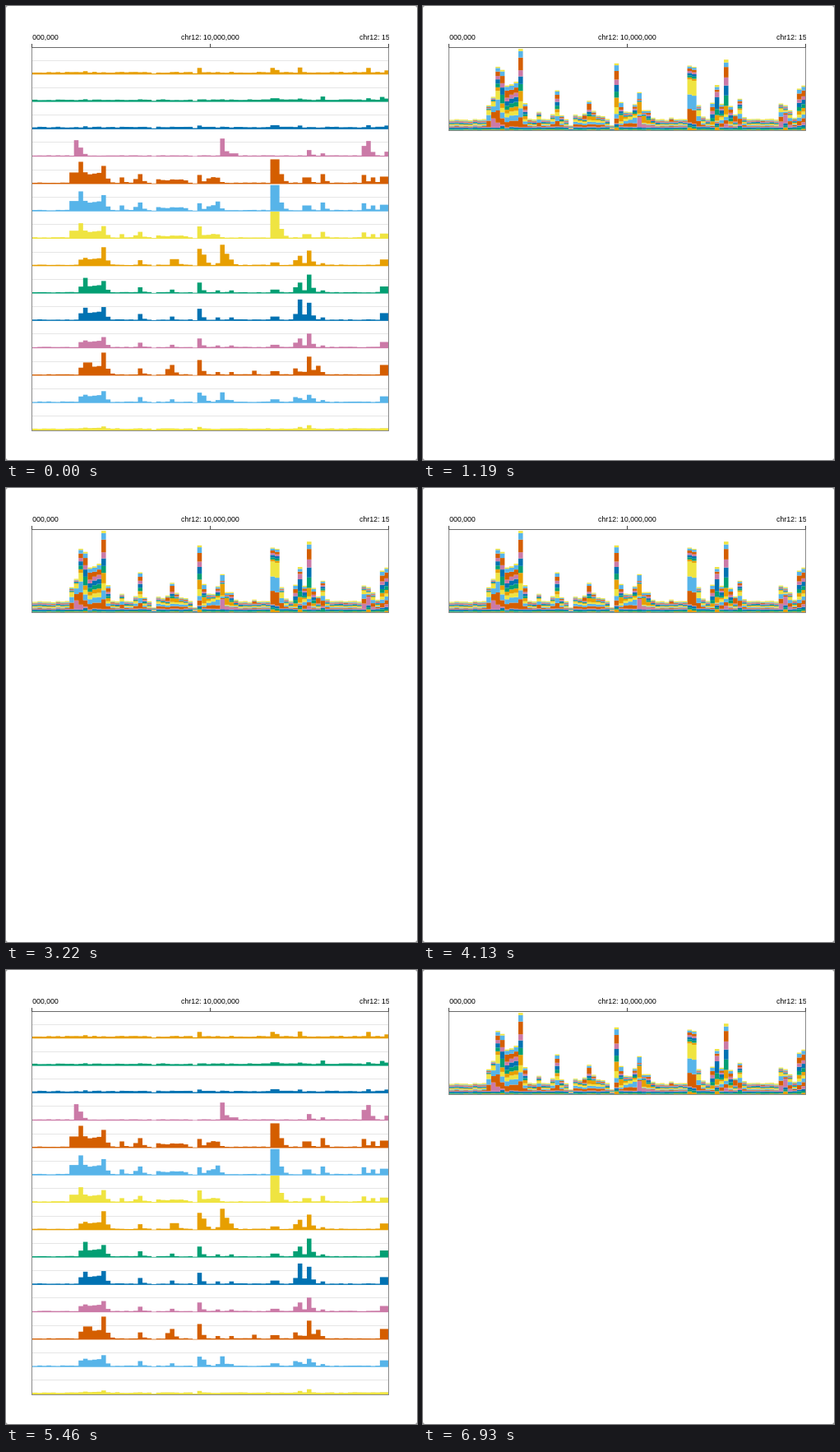
Animation of 500x552 px, one loop 7280 ms. Source, as a matplotlib script:

```python
import numpy as np
import matplotlib.pyplot as plt
from matplotlib.animation import FuncAnimation
from matplotlib.patches import Polygon, Rectangle

W, H, DPI = 500, 552, 64
PX = 72 / DPI                       # points per pixel
STEP, LOOP, CYCLE = 70, 7280, 5740  # ms
LEFT, RIGHT, TOP = 31.5, 465.5, 50.5
ROW_H = 466 / 14
STACK_BOTTOM, STACK_SCALE = 152, 0.55
BINS, BIN_W, FIRST_BIN = 78, 5.555, 32.7
TAIL = 0.3                          # fall-off per bin after a peak
COLORS = ["#E79F00", "#029F73", "#0072B2", "#CB7AA7",
          "#D45E00", "#57B4E9", "#EFE441"]
GRAY, PALE = "#8a8a8a", "#e6e6e6"

plt.rcParams["font.family"] = "Liberation Sans"
fig = plt.figure(figsize=(W / DPI, H / DPI), dpi=DPI, facecolor="white")
ax = fig.add_axes([0, 0, 1, 1])
ax.set_xlim(0, W)
ax.set_ylim(H, 0)
ax.axis("off")

edges = np.concatenate([[31], FIRST_BIN + BIN_W * np.arange(BINS), [466]])
rng = np.random.default_rng(12)
wobble = rng.uniform(0.8, 1.2, BINS)
rows = []

# Peaks shared by related samples: (bin, width, height)
FLAT = [(11, 1, 4), (36, 1, 5), (52, 2, 5.5), (58, 1, 5), (73, 1, 5.5),
        (77, 1, 5)]
BROAD = [(8, 2, 14), (11, 4, 14), (10, 1, 27), (15, 1, 22), (19, 1, 8),
         (22, 1, 6), (23, 1, 12), (27, 7, 5), (36, 1, 11), (38, 3, 8),
         (52, 2, 30), (54, 1, 12), (59, 2, 8), (63, 1, 12), (72, 1, 11),
         (74, 1, 8), (76, 2, 9)]
SHARP = [(10, 5, 11), (15, 1, 16), (23, 1, 8), (30, 1, 5), (36, 1, 14),
         (40, 1, 4), (43, 1, 4), (52, 2, 5), (57, 1, 8), (58, 1, 14),
         (60, 1, 21), (63, 1, 4), (76, 2, 9)]


def signal(peaks):
    y = np.zeros(BINS)
    for first, width, height in peaks:
        end = first + width
        y[first:end] = height
        if width > 2:
            y[first:end] *= wobble[first:end]
        for k, i in enumerate(range(end, min(end + 4, BINS)), 1):
            y[i] = max(y[i], height * TAIL ** k)
    return y


def add_row(floor, peaks, scale=1, *own):
    """One sample: scaled family peaks, its own peaks and a noisy floor."""
    scaled = [(first, width, h * scale) for first, width, h in peaks]
    noise = floor * rng.uniform(0.8, 1.2, BINS)
    noise[[26, 35]] *= 0.5
    y = np.maximum(signal(scaled + list(own)), noise)
    rows.append(np.concatenate([y[:1], y]))


add_row(2.7, FLAT, 1, (36, 1, 8), (52, 1, 8), (58, 1, 8.5), (73, 1, 8))
add_row(2.6, FLAT, 0.8, (36, 1, 3), (63, 1, 6.5), (76, 1, 6))
add_row(2.6, FLAT, 0.9)
add_row(1.4, [(9, 1, 20), (10, 1, 11), (41, 1, 22), (43, 2, 4), (60, 1, 8),
              (63, 1, 4), (72, 1, 13), (73, 1, 19), (77, 1, 6)])
add_row(1.6, BROAD)
add_row(1.6, BROAD, 0.9, (40, 1, 12), (52, 2, 32))
add_row(1.6, BROAD, 0.7, (36, 1, 15), (52, 2, 33), (54, 1, 12))
add_row(1.6, SHARP, 0.9, (15, 1, 23), (30, 2, 8.5), (36, 1, 21), (37, 1, 14),
        (41, 1, 26), (42, 1, 15), (43, 1, 8))
add_row(1.6, SHARP, 0.95, (11, 1, 19), (60, 1, 23))
add_row(1.6, SHARP, 1.05, (11, 1, 16), (58, 1, 26))
add_row(1.6, SHARP, 0.85)
add_row(1.5, SHARP, 1.1, (11, 2, 16), (15, 1, 28), (29, 1, 8), (30, 1, 13),
        (36, 1, 19), (48, 1, 6), (58, 1, 5), (62, 1, 12), (76, 2, 13))
add_row(1.6, SHARP, 0.9, (37, 1, 9), (41, 1, 13), (58, 1, 6), (60, 1, 10))
add_row(2.2, SHARP, 0.3)


def line(x, y, color=GRAY, z=3):
    return ax.plot(x, y, color=color, lw=PX, zorder=z, snap=False,
                   solid_capstyle="butt")[0]


def frame(bottom, closed=True):
    parts = [line([x, x], [TOP, bottom]) for x in (LEFT, RIGHT)]
    if closed:
        parts.append(line([LEFT - 0.5, RIGHT + 0.5], [bottom, bottom]))
    return parts


def area(top, bottom, i):
    return ax.stairs(top, edges, baseline=bottom, fill=True, lw=0,
                     color=COLORS[i % len(COLORS)], zorder=2, snap=False)


def row_parts(i):
    base = TOP - 0.5 + ROW_H * (i + 1)
    mid = round(base - ROW_H / 2) - 0.5
    floor = np.full(BINS + 1, base)
    return [area(floor - rows[i], floor, i),
            line([LEFT, RIGHT], [mid, mid], PALE, 1)]


def stack_parts():
    parts = []
    bottom = np.full(BINS + 1, float(STACK_BOTTOM))
    for i, row in enumerate(rows):
        top = np.maximum(bottom - STACK_SCALE * row, TOP)
        parts.append(area(top, bottom, i))
        bottom = top
    return parts


def draw_axis():
    line([LEFT - 0.5, RIGHT + 0.5], [TOP, TOP], "#6a6a6a", 4)
    window = Rectangle((32, 0), 434, 60, transform=ax.transData)
    middle = (LEFT + RIGHT) / 2
    for x, pos in ((LEFT, 5), (middle, 10), (RIGHT, 15)):
        line([x, x], [46, TOP], "#444444", 4)
        label = ax.text(x - 0.5, 40.8, f"chr12: {pos},000,000", ha="center",
                        va="baseline", fontsize=8.75 * PX, color="black")
        label.set_clip_on(True)
        label.set_clip_path(window)


def draw_corners():
    for x, dx in ((0, 2), (W, -2)):
        for y, dy in ((0, 2), (H, -2)):
            ax.add_patch(Polygon([(x, y), (x + dx, y), (x, y + dy)],
                                 color="#a0a0a0", lw=0))


draw_axis()
draw_corners()
tracks = [row_parts(i) for i in range(len(rows))]
first_rows = sum(tracks[:3], [])
other_rows = sum(tracks[3:], [])
views = {
    "rows": first_rows + other_rows + frame(516.5),
    "partial": first_rows + frame(158.5, closed=False),
    "stack": stack_parts() + frame(STACK_BOTTOM - 0.5),
}
everything = sum(views.values(), [])


def view_at(ms):
    t = ms % CYCLE
    if 490 <= t < 1190:
        return "partial"
    if 1190 <= t < 4410:
        return "stack"
    return "rows"


def update(n):
    shown = views[view_at(n * STEP)]
    for part in everything:
        part.set_visible(False)
    for part in shown:
        part.set_visible(True)
    return everything


anim = FuncAnimation(fig, update, frames=LOOP // STEP, interval=STEP,
                     repeat=True, repeat_delay=0, blit=False)
plt.show()
```
